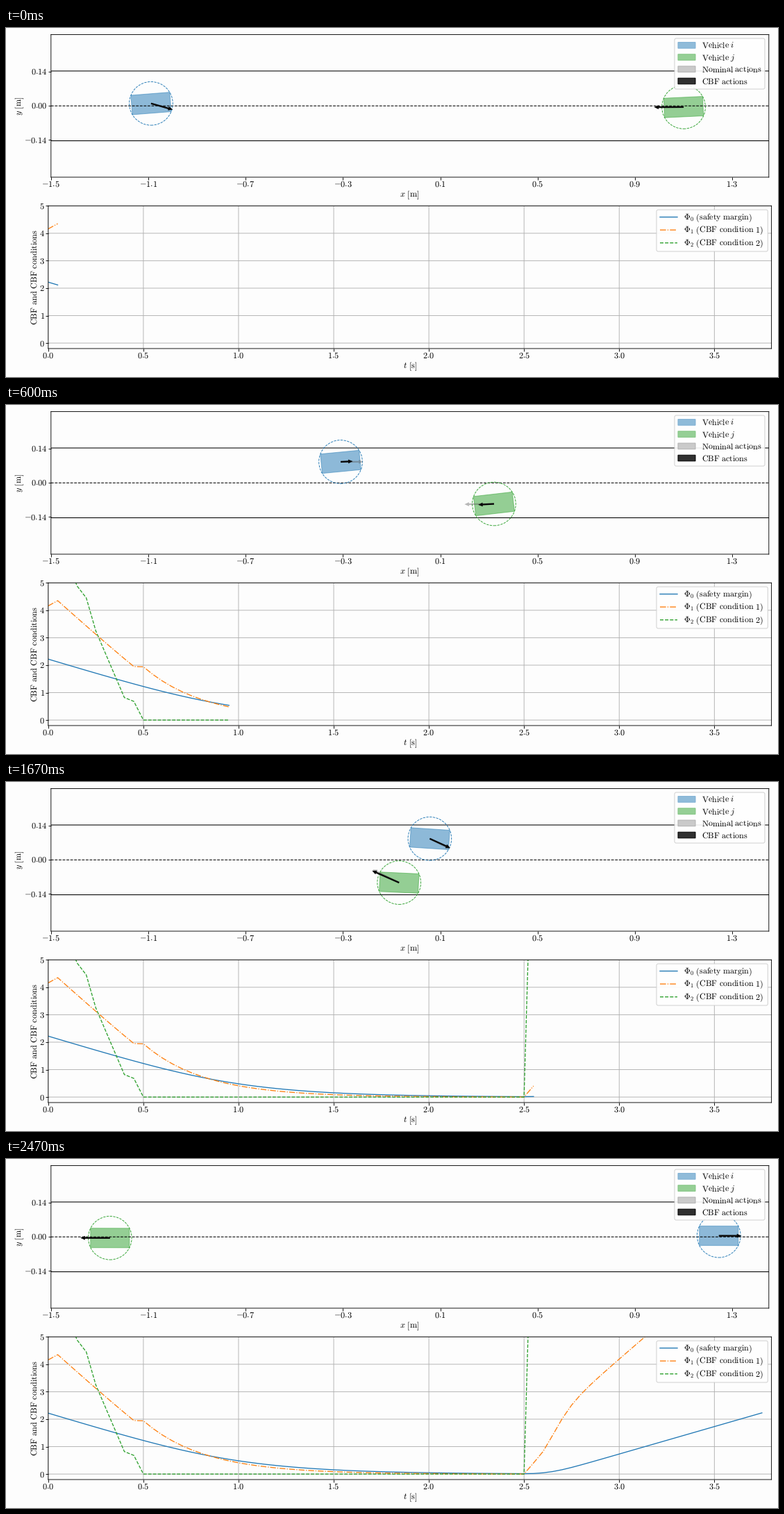
Animation, 1112 px wide and 503 px high, one loop 2.54 s. Source, as a matplotlib script:

```python
import numpy as np
import matplotlib.pyplot as plt
from matplotlib.animation import FuncAnimation
from matplotlib.patches import Circle, FancyBboxPatch, Polygon, Rectangle

W, H, DPI = 1112, 503, 64
PT = 72 / DPI                      # points per pixel
SCALE = 350.5                      # pixels per metre on the road
BG = "#fdfdfd"
BLUE, ORANGE, GREEN = "#1f77b4", "#ff7f0e", "#2ca02c"
STEPS, TICK, LOOP = 38, 20, 2540
BRAKE, PASS = 0.475, 2.52          # braking starts, vehicles pass each other

plt.rcParams.update({"mathtext.fontset": "cm", "text.hinting": "none",
                     "path.snap": False, "axes.linewidth": 0.9 * PT})


# ---- barrier functions of simulation time ----
def logistic(u):
    return 1 / (1 + np.exp(-u))


def margin(t):
    """Closes at a speed of 2.1 tanh(1.12 phi), then opens again at 2 m/s."""
    closing = np.arcsinh(np.sinh(1.12 * 2.22) * np.exp(-2.352 * t)) / 1.12
    opening = 0.108 * np.logaddexp(0, (t - 2.635) / 0.054)
    return np.where(t < PASS, closing, opening)


T = np.arange(77) * 0.05
phi0 = margin(T)
phi1 = np.select([T < 0.01, T < BRAKE, T < PASS],
                 [3 * phi0 - 2.5, 3 * phi0 - 2, 1.94 * np.exp(-3.1 * (T - 0.5))],
                 3 * phi0 + 2 * logistic((T - 2.635) / 0.054))
phi2 = np.interp(T, [0, .15, .2, .25, .4, .45, .5, 2.5, 2.55],
                 [8.2, 4.9, 4.45, 3.25, .82, .68, 0, 0, 12])

# ---- stage ----
fig = plt.figure(figsize=(W / DPI, H / DPI), dpi=DPI, facecolor=BG)


def panel(left, top, right, bottom, xlim, ylim, xticks, yticks):
    ax = fig.add_axes([left / W, 1 - bottom / H, (right - left) / W,
                       (bottom - top) / H], facecolor=BG)
    ax.set(xlim=xlim, ylim=ylim, xticks=xticks, yticks=yticks)
    ax.tick_params(labelbottom=False, labelleft=False,
                   length=3.6 * PT, width=0.9 * PT)
    return ax


road_x = np.arange(8) * 0.4 - 1.5
road = panel(64.8, 9.5, 1098.8, 215, (-1.5, 1.45), (-.2932, .2932),
             road_x, [-.14, 0, .14])
plot = panel(60.8, 256.3, 1102.6, 462, (0, 3.8), (-.2, 5),
             np.arange(8) / 2, range(6))
plot.grid(color="#b0b0b0", lw=0.9 * PT)

# overlay in pixels, y pointing down
ui = fig.add_axes([0, 0, 1, 1], zorder=5)
ui.set(xlim=(0, W), ylim=(H, 0))
ui.axis("off")


def rm(s):
    return r"\mathrm{" + s.replace(" ", r"\ ") + "}"


def put(x, y, s, ha="center", size=12.3, **kw):
    kw.setdefault("va", "baseline")
    ui.text(x, y, f"${s}$", ha=ha, fontsize=size * PT, color="black", **kw)


for i, v in enumerate(road_x):
    put(64.5 + 0.4 * SCALE * i, 229.2, f"{v:.1f}")
for v in (-.14, 0, .14):
    put(59.5, 116.2 - v * SCALE, f"{v:.2f}", "right")
for i in range(8):
    put(60.8 + 137.07 * i, 475.8, f"{i / 2:.1f}")
for i in range(6):
    put(55.8, 458.3 - 39.57 * i, str(i), "right")
put(581.5, 244.2, "x" + rm(" [m]"))
put(582, 491, "t" + rm(" [s]"))
put(20, 112.2, "y" + rm(" [m]"), rotation=90, va="center")
put(40.5, 359.5, rm("CBF and CBF conditions"), rotation=90, va="center")

for y, ls in ((.1435, "-"), (0, "--"), (-.1435, "-")):
    road.axhline(y, color="black", lw=1.05 * PT, ls=ls)


# ---- legends ----
def legend_box(x0, y0, x1, y1):
    ui.add_patch(FancyBboxPatch((x0 + 2, y0 + 2), x1 - x0 - 4, y1 - y0 - 4,
                                boxstyle="round,pad=2,rounding_size=2.4",
                                fc="white", ec="0.8", lw=PT, alpha=0.9))


legend_box(963, 15, 1093, 88)
for row, (label, fc, ec) in enumerate([
        (rm("Vehicle ") + "i", "#8fbbd9", "#7fb0d4"),
        (rm("Vehicle ") + "j", "#95cf95", "#84c684"),
        (rm("Nominal actions"), "#cacaca", "#b2b2b2"),
        (rm("CBF actions"), "#303030", "#000000")]):
    y = 25 + 17.2 * row
    ui.add_patch(Rectangle((968, y - 4.4), 25, 8.6, fc=fc, ec=ec, lw=PT))
    put(1002, y + 4, label, "left", 12.05)

STYLES = [(BLUE, "-"), (ORANGE, "-."), (GREEN, "--")]
legend_box(937, 262, 1097.3, 322)
for row, (note, (color, ls)) in enumerate(zip(
        ("safety margin", "CBF condition 1", "CBF condition 2"), STYLES)):
    y = 272.5 + 18.6 * row
    ui.plot([942, 967], [y, y], color=color, ls=ls, lw=1.35 * PT)
    put(976, y + 4.2, rf"\Phi_{row}" + rm(f" ({note})"), "left", 12.05)

curves = [plot.plot([], [], color=c, ls=ls, lw=1.3 * PT)[0] for c, ls in STYLES]


# ---- vehicles ----
def turn(pts, deg):
    a = np.radians(deg)
    c, s = np.cos(a), np.sin(a)
    return np.asarray(pts) @ np.array([[c, s], [-s, c]])


def arrow(length, side, deg):
    head = min(6.5, length)
    hw = 2.9 * min(1, length / 5)
    sw, neck = min(1.15, hw), length - head
    pts = np.array([(0, -sw), (neck, -sw), (neck, -hw), (length, 0),
                    (neck, hw), (neck, sw), (0, sw)])
    return turn(pts * [side, 1], deg) / SCALE


BODY = np.array([(-.08, -.04), (.08, -.04), (.08, .04), (-.08, .04)])


class Vehicle:
    """Drives towards `side`, swerving out and back along logistic ramps.

    swerve and back hold the steepness and the centre of each ramp.
    """

    def __init__(self, color, side, reach, swerve, back, kick):
        self.side, self.reach, self.kick = side, reach, kick
        self.swerve, self.back = swerve, back
        self.body = self.poly(1, fc=color, ec=color, lw=PT, alpha=0.5)
        self.ring = road.add_patch(Circle((0, 0), np.hypot(.08, .04), fill=False,
                                          ec=color, ls="--", lw=0.9 * PT, zorder=2))
        self.nominal = self.poly(3, fc="0.35", ec="none", alpha=0.42)
        self.action = self.poly(4, fc="#080808", ec="none")

    @staticmethod
    def poly(z, **kw):
        return road.add_patch(Polygon(BODY, closed=True, zorder=z, **kw))

    def pose(self, t):
        """Position, heading, steering aim and speed at time t."""
        if t < PASS:
            gap, mid = .05 + .4934 * margin(t), .0055
            (k, c), floor, yaw = self.swerve, 0, 1.65
            kick = self.kick * np.exp((.05 - t) / .1)
            speed = 1 if t < BRAKE else np.tanh(1.12 * margin(t))
        else:
            gap, mid = -.063 - .99 * (t - 2.55), -.0065
            (k, c), floor, yaw = self.back, .004, .85
            kick = -22.5 * np.exp((2.55 - t) / .15)
            speed = 1
        p = logistic(k * (-gap - c))
        heading = yaw * np.degrees(np.arctan(.099 * k * p * (1 - p)))
        at = np.array([mid - self.side * gap, self.side * (floor + .099 * p)])
        return at, heading, heading / 2 + kick, speed

    def move(self, t):
        at, heading, aim, speed = self.pose(t)
        drift = -2.5 if BRAKE < t < 2.6 else 0
        self.body.set_xy(at + turn(BODY, heading))
        self.ring.center = at
        self.nominal.set_xy(at + arrow(self.reach, self.side, aim + drift))
        self.action.set_xy(at + arrow(self.reach * speed, self.side, aim))


cars = [Vehicle(BLUE, 1, 32.5, (5.3, -.68), (-5.8, .35), -18),
        Vehicle(GREEN, -1, 42.5, (6.3, -.62), (-6.5, .41), -1)]


def draw(frame):
    # the picture steps 15 times a second, 0.1 s of simulation per step
    step = min(STEPS - 1, int((frame * TICK + 15) * 3 / 200))
    n = 2 * step + 1
    for car in cars:
        car.move(T[n])
    for line, phi in zip(curves, (phi0, phi1, phi2)):
        line.set_data(T[:n + 1], phi[:n + 1])
    return curves


anim = FuncAnimation(fig, draw, frames=LOOP // TICK, interval=TICK,
                     repeat=True, repeat_delay=0, blit=False)
plt.show()
```
